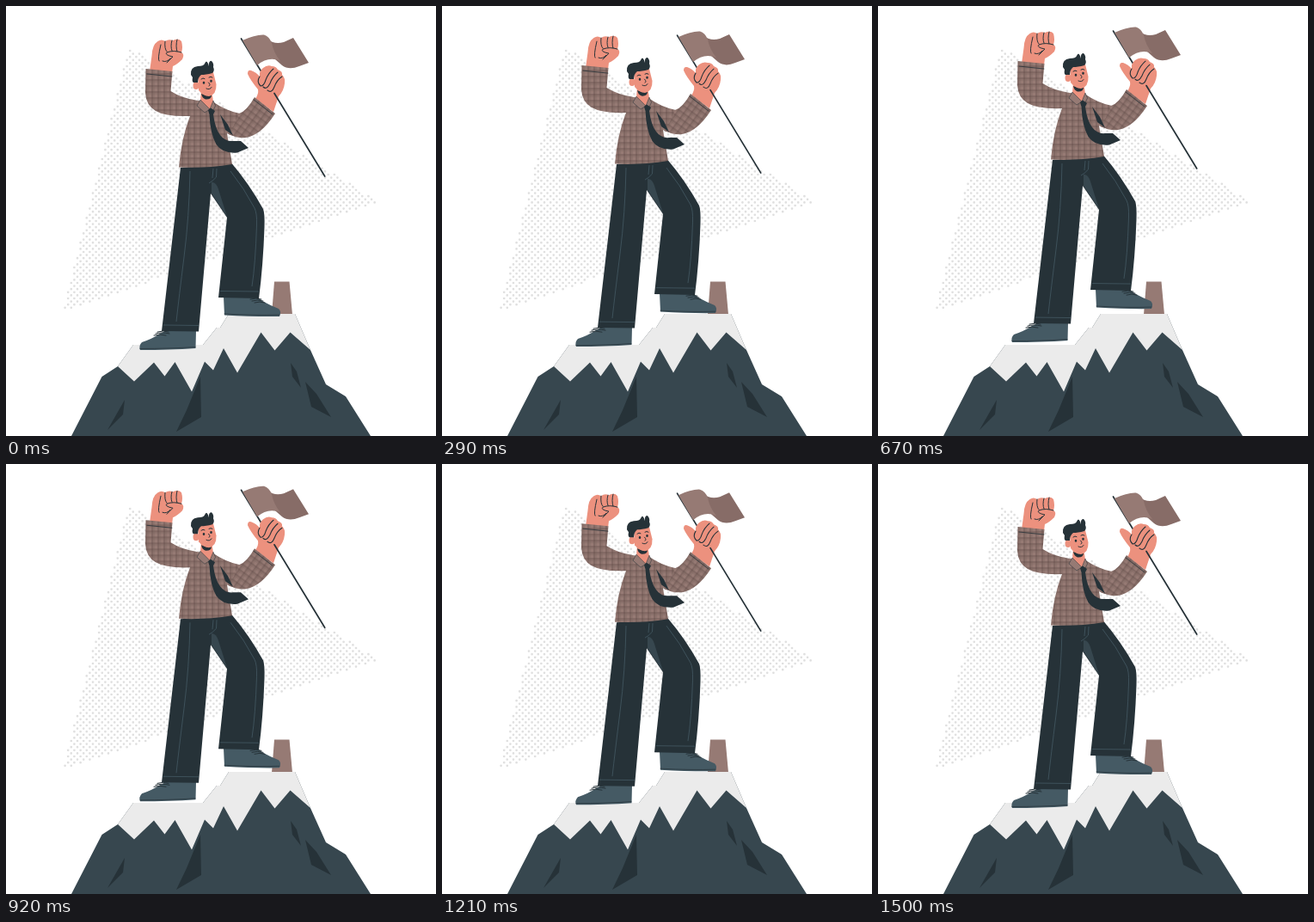
An HTML page that plays this animation: 500 by 500 pixels, repeating every 1540 ms.

```html
<!DOCTYPE html>
<html lang="en">
<head>
<meta charset="utf-8">
<title>On the summit</title>
<style>
  html, body { margin: 0; height: 100%; overflow: hidden; background: #fff; }
  svg { display: block; width: 100%; height: 100%; }
  .dots { fill: none; stroke: #e0e0e0; stroke-width: 2.7; stroke-linecap: round; }
  .rock { fill: #37474f; }
  .snow { fill: #ebebeb; }
  .dark { fill: #263238; }
  .shoe { fill: #455a64; }
  .skin { fill: #ec917e; }
  .brown { fill: #967a74; }
  .shade { fill: #876c67; }
  .line { fill: none; stroke: #263238; stroke-linecap: round; stroke-linejoin: round; }
  .seam { fill: none; stroke: #455a64; stroke-width: .8; }
</style>
</head>
<body>
<svg viewBox="0 0 500 500">
  <defs>
    <pattern id="plaid" width="7" height="7" patternUnits="userSpaceOnUse">
      <path class="brown" d="M0 0H7V7H0Z"/>
      <path d="M0 2H7M2 0V7" stroke="#5f4b48" stroke-width=".75"/>
      <path d="M0 4H7M4 0V7" stroke="#755e59" stroke-width=".5"/>
    </pattern>
    <pattern id="plaidTilted" href="#plaid" patternTransform="rotate(36)"/>
  </defs>

  <path class="dots" id="dots"/>

  <g id="mountain">
    <path class="brown" d="M312 320.500H329.500L333 359H309Z"/>
    <path class="rock" d="M76 500L111.500 431L130 419L148 394H229L245 374H249L259 358H336L354 400L372 440L395 454L424 500Z"/>
    <path class="snow" d="M130 419L148 394H229L245 374H249L259 358H336L354 400L330.500 379.500L312.500 400.500L296.500 379.500L269 426.500L253 398L241 423.500L231 413.500L216 448.500L196.500 414L184.500 430.500L172 414.500L149 436.500Z"/>
    <path class="dark" d="M138 458L118 493L136 475ZM226 431L227 478L198 495L210 470ZM331 415L338 425L343 444L333 431ZM348 437L361 451L378 478L355 466Z"/>
  </g>

  <g id="climber">
    <g id="shoes">
      <path class="shoe" d="M187 377H221L220.500 398Q190 400 156 400Q154 395 158 391Q170 387 179 381ZM253 338L254 359.500Q290 361.500 318 361Q320.500 355 317 352Q307 348 298 343L292 338Z"/>
      <path class="line" stroke-width=".7" d="M156 398.500Q190 398.500 220 396.500M254 358Q290 360 318 359"/>
      <path class="line" stroke-width="1" d="M174 381Q181 379 190 381M176 379Q183 377 189 379M172 383Q179 381 186 383M284 341Q291 339 297 341M286 343Q292 341 299 343M289 345Q295 343 301 345"/>
    </g>

    <g id="trousers">
      <path class="dark" d="M203 188L262.500 183Q283 207 299 236Q301 241 300.500 257Q299 302 294 340L247 339L257 246L238 218L224 378.500L181 378Z"/>
      <path class="rock" d="M239 205Q244 204 247 213L257 245L239 218Z"/>
      <path class="seam" d="M214 192Q213 245 207 292Q201 340 198 367M183 371L224 371.500M261 192Q277 212 289 235Q292 241 291.500 255Q290 300 286 326M249 331.500L294 332M241 189L240 200M245 189L244.500 199Q240 204 236 206"/>
    </g>

    <g id="flag">
      <path class="line" stroke-width="1.700" d="M273.500 38L300 81.500"/>
      <path class="shade" d="M305 39Q312 45 323 42L334 37L352 66L341 70Q329 75 321 69L313 62Z"/>
      <path class="brown" d="M275 40Q290 33 300 33.500Q306 35 309 43Q311 54 319 64Q305 58 292 69Z"/>
    </g>

    <g id="hands">
      <path class="skin" d="M167 76L169.500 58Q170 45 176.500 41Q181 38 185 41Q189 38 194 40Q201 37 204 41Q206 48 204 54Q208 56 205 62Q199 68 194 70L193 78Z"/>
      <path class="line" stroke-width="1" d="M178 64Q176 62 180 45M182 64Q187 66 191 61M185 41Q184 50 187 53M193 40Q191 47 193 52M199 39Q197 47 199 53M204 54Q195 51 187 54Q184 57 194 59Q190 63 187 66"/>
      <path class="skin" d="M290 108Q294 102 293 97Q284 86 281 79Q281 74 285 75Q291 77 295 82Q294 76 299 72Q304 68 309 70Q314 70 316 74Q322 76 321 80Q325 84 324 90Q323 99 317 105L311 123Z"/>
      <path class="line" stroke-width="1.100" d="M295 82Q291 88 296 93Q300 93 302 86Q305 78 311 73M299 94Q303 98 307 90Q310 82 316 77M304 98Q309 102 312 94Q315 86 321 82"/>
      <path class="line" stroke-width="1.700" d="M312 101.500L370.700 198"/>
    </g>

    <g id="shirt">
      <path fill="url(#plaid)" d="M162.500 73L193.500 76L191.500 99Q204 107 223 110L240 111Q256 122 272 125L276 152Q262 152 257 148L263 184Q232 189 201 187.500Q204 153 214 128Q186 129 174 122Q163 116 162 101Z"/>
      <path fill="url(#plaidTilted)" d="M271 125Q280 122 289 106L313 125Q297 150 279 153Q268 154 260 149Z"/>
      <path class="line" stroke-width=".8" d="M164 79L193 82M288 109L310 126"/>
    </g>

    <g id="head">
      <path class="skin" d="M227 98L226 110L237 121L241 111L239 98Z"/>
      <path class="dark" d="M227 102Q234 105 239 104Q238.500 109 232 108.500Q228 107 227 102Z"/>
      <path class="skin" d="M223 79L224 98Q229 104.500 236 105Q245 103 244.500 91L241 77Z"/>
      <ellipse class="skin" cx="221" cy="92.500" rx="3.500" ry="4.500"/>
      <path class="dark" d="M215 80Q214 71 223 70Q230 70 231 67Q233 62 235 67L235.500 70Q236 63 239 64Q242 67 241 71Q243 75 240 78Q232 80 227 80Q223 83 223 89L218 89Q216 88 217 83Z"/>
      <path class="line" stroke-width="1" d="M227 85Q229 83 231 84.500M236 83Q238 81.500 240 83M235.500 89Q238.500 92 236 93M233 96Q237 98 239 94.500"/>
      <path class="line" stroke-width="2.500" d="M230 89v.5M238.500 87v.5"/>
    </g>

    <g id="tie">
      <path class="brown" stroke="#263238" stroke-width=".5" d="M226 109L222 116L231 124L237 120ZM241 110L243.500 116L241 121L237 120Z"/>
      <path class="dark" d="M249 126L258 138L264 150.500L255 144ZM235 121L238 118.500L243 122L241 126Q243 142 249 150Q255 158 264 157L273 157L282 165L269 170.500Q252 172 244.500 161Q237.500 149 236.500 126Z"/>
    </g>
  </g>
</svg>
<script>
  const climber = document.getElementById('climber');
  const LOOP = 1540, FLOAT = 1500, LIFT = 10, GAP = 7.2;

  // Staggered dots filling a triangle
  const corners = [[143, 48], [433, 227], [66, 356]];
  const inside = (x, y) => corners.every(([ax, ay], i) => {
    const [bx, by] = corners[(i + 1) % 3];
    return (bx - ax) * (y - ay) >= (by - ay) * (x - ax);
  });
  let dots = '';
  for (let row = 0, y = 52; y < 358; row++, y += GAP / 2) {
    for (let x = 65 + row % 2 * GAP / 2; x < 435; x += GAP) {
      if (inside(x, y)) dots += `M${x.toFixed(2)} ${y.toFixed(2)}h.01`;
    }
  }
  document.getElementById('dots').setAttribute('d', dots);

  // Linear rise and fall, with a short rest before the loop repeats
  function draw(now) {
    const phase = Math.min(now % LOOP / FLOAT, 1);
    const lift = LIFT * (1 - Math.abs(1 - 2 * phase));
    climber.setAttribute('transform', `translate(0 ${-lift})`);
    requestAnimationFrame(() => draw(performance.now()));
  }
  draw(performance.now());
</script>
</body>
</html>
```
